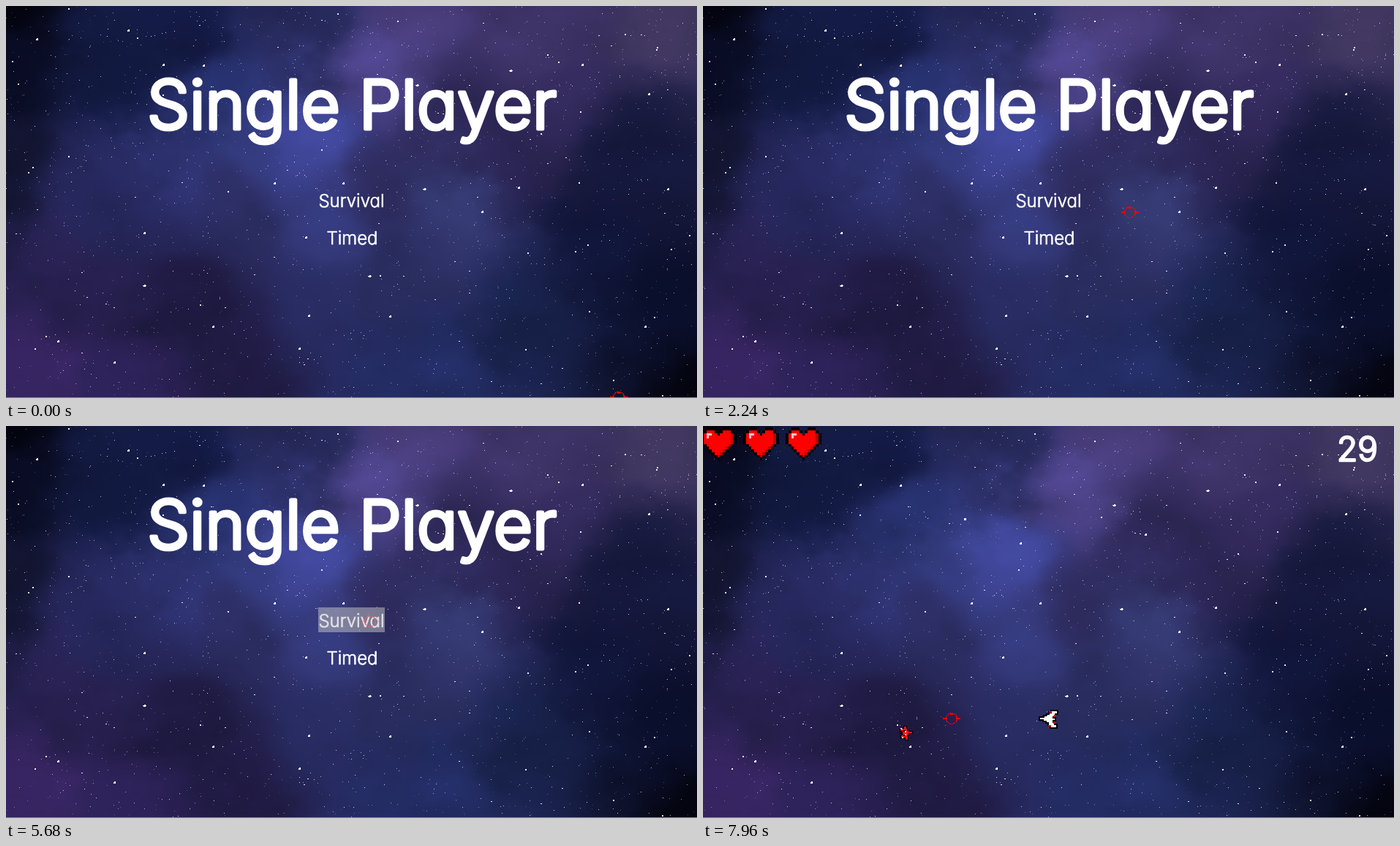
Animation, 945 px wide and 536 px high, one loop 8000 ms. Source, as an HTML page with a canvas:

```html
<!DOCTYPE html>
<html lang="en">
<head>
<meta charset="utf-8">
<title>Space shooter</title>
<style>
  html, body { margin: 0; width: 100%; height: 100%; overflow: hidden; background: #03040e; }
  canvas, svg { position: absolute; left: 0; top: 0; width: 945px; height: 536px; }
  text {
    font-family: Inter, "Open Sans", sans-serif; font-weight: 300;
    font-feature-settings: "cv11"; text-anchor: middle;
    fill: #fff; stroke: #fff; stroke-linejoin: round;
  }
  .title { font-size: 92px; stroke-width: 5px; }
  .item { font-size: 24px; stroke-width: .7px; }
  .timer { font-size: 46px; stroke-width: 2.4px; }
  .pixel { shape-rendering: crispEdges; }
</style>
</head>
<body>
<canvas id="sky" width="945" height="536"></canvas>
<svg viewBox="0 0 945 536">
  <defs>
    <g id="heart" class="pixel" transform="scale(3.77)">
      <path d="M2 0h3v1h1v1h1v-1h1v-1h3v1h1v1h1v4h-1v1h-1v1h-1v1h-1v1h-1v1h-1v1h-1v-1h-1v-1h-1v-1h-1v-1h-1v-1h-1v-1h-1v-4h1v-1h1z"/>
      <path fill="#f00" d="M2 1h3v1h1v1h1v-1h1v-1h3v1h1v4h-1v1h-1v1h-1v1h-1v1h-1v1h-1v-1h-1v-1h-1v-1h-1v-1h-1v-1h-1v-4h1z"/>
      <path fill="#b80000" d="M11 2h1v4h-1v1h-1v1h-1v1h-1v1h-1v1h-1v-1h1v-1h1v-1h1v-1h1v-1h1z"/>
      <path fill="#ffc4c4" d="M2 2h2v1h-1v1h-1z"/>
    </g>
  </defs>

  <g id="menu">
    <text class="title" x="473" y="167.5">Single Player</text>
    <text class="item" x="472.5" y="275">Survival</text>
    <text class="item" x="473.5" y="326">Timed</text>
  </g>

  <g id="game">
    <use href="#heart" x="-3" y="2"/>
    <use href="#heart" x="55" y="2"/>
    <use href="#heart" x="113" y="2"/>
    <text class="timer" id="timer" x="895" y="48"></text>
    <g id="ship" class="pixel">
      <path fill="#fff" stroke="#000" stroke-width="4" paint-order="stroke"
        d="M-1-11h2v5h2v4h2v3h3v3h3v7h-3v-3h-3v-2h-4v3h-2v-3h-4v2h-3v3h-3v-7h3v-3h3v-3h2v-4h2z"/>
      <path fill="#e00000" d="M-11 0h2v4h-2zM9 0h2v4h-2zM-6 7h3v3h-3zM3 7h3v3h-3z"/>
    </g>
    <g id="enemy" class="pixel">
      <path fill="#f01414" stroke="#000" stroke-width="2" paint-order="stroke"
        d="M-1-10h2v5h2v2h6v3h-3v6h-3v-3h-6v3h-3v-6h-3v-3h6v-2h2z"/>
      <path d="M-4-1h2v3h-2zM2-1h2v3h-2zM-1 3h2v4h-2z"/>
      <path fill="#fff" d="M-3-2h2v2h-2zM1-2h2v2h-2zM-7 3h2v2h-2zM5 3h2v2h-2z"/>
    </g>
  </g>

  <g id="cursor" class="pixel" fill="none" stroke="#f00">
    <circle r="7.5" stroke-dasharray="5 1"/>
    <path id="arms" stroke-width="2" d="M-12 0h6M6 0h6M-2-6h4"/>
  </g>
  <rect id="highlight" x="427" y="248" width="91" height="34" fill="#c8c8c8" opacity=".5"/>
  <rect y="535" width="945" height="1" fill="#88869a"/>
</svg>

<script>
const W = 945, H = 536, LOOP = 8000, GAME_START = 6840;
const el = id => document.getElementById(id);

let seed = 7;
function random() {
  seed = (Math.imul(seed, 1664525) + 1013904223) >>> 0;
  return seed / 4294967296;
}

const lattice = Float32Array.from({ length: 65536 }, random);
function noise(x, y) {
  const ix = Math.floor(x), iy = Math.floor(y);
  const smooth = v => v * v * (3 - 2 * v);
  const u = smooth(x - ix), v = smooth(y - iy);
  const at = (a, b) => lattice[(a & 255) + 256 * (b & 255)];
  const top = at(ix, iy) * (1 - u) + at(ix + 1, iy) * u;
  const low = at(ix, iy + 1) * (1 - u) + at(ix + 1, iy + 1) * u;
  return top * (1 - v) + low * v;
}
function clouds(x, y) {
  let sum = 0, amp = .5;
  for (let i = 0; i < 5; i++, amp /= 2, x = x * 2 + 17, y = y * 2 + 31) sum += amp * noise(x, y);
  return sum - .48;
}

// Main tones of the nebula: x, y, colour
const tones = [
  [0, 0, "03040e"], [150, 100, "121a42"], [300, 110, "252f6a"], [350, 180, "343c80"],
  [415, 190, "40479a"], [520, 90, "50468f"], [570, 25, "493d7b"], [720, 60, "3f3468"],
  [900, 20, "433963"], [760, 135, "32295a"], [630, 140, "2b2552"], [700, 215, "292350"],
  [870, 200, "14173a"], [900, 400, "0a0f2c"], [945, 536, "03040e"], [720, 430, "172149"],
  [600, 490, "222c62"], [520, 500, "242d66"], [610, 290, "33386f"], [440, 300, "363c80"],
  [310, 280, "2a2b5e"], [220, 235, "2f3474"], [145, 270, "25265a"], [230, 395, "1e1940"],
  [100, 375, "292152"], [50, 500, "34235d"], [330, 485, "211b45"], [430, 420, "272b60"],
  [0, 200, "131532"], [0, 90, "080b22"], [800, 310, "10153a"], [250, 25, "131a45"],
  [400, 25, "242756"], [520, 240, "2f2c60"], [530, 340, "2b2e62"], [180, 490, "2a2053"]
].map(([x, y, hex]) => [x, y, ...[0, 2, 4].map(i => parseInt(hex.slice(i, i + 2), 16))]);

const brightStars = [
  167, 33, 270, 81, 562, 108, 879, 120, 605, 148, 434, 160, 461, 242, 367, 242, 572, 250, 651, 281,
  905, 250, 401, 468, 410, 316, 189, 310, 189, 382, 414, 423, 148, 487, 71, 458, 874, 438, 788, 80,
  690, 88, 215, 80, 358, 127, 42, 45, 701, 248, 525, 424, 497, 369, 283, 438
];

function paintSky() {
  const ctx = el("sky").getContext("2d");
  const image = ctx.createImageData(W, H);
  for (let y = 0, p = 0; y < H; y++) {
    for (let x = 0; x < W; x++, p += 4) {
      const n = clouds(x / 110, y / 80), m = clouds(x / 75 + 90, y / 55 + 50);
      const wx = x + 110 * n, wy = y + 90 * m;
      let r = 0, g = 0, b = 0, total = 0;
      for (const tone of tones) {
        const dx = wx - tone[0], dy = wy - tone[1], d = dx * dx + dy * dy + 1200;
        const w = 1 / (d * d);
        r += w * tone[2]; g += w * tone[3]; b += w * tone[4]; total += w;
      }
      const shade = (1 + .3 * m) / total;
      image.data[p] = r * shade;
      image.data[p + 1] = g * shade;
      image.data[p + 2] = b * shade;
      image.data[p + 3] = 255;
    }
  }
  ctx.putImageData(image, 0, 0);

  for (let i = 0; i < 1900; i++) {
    const x = Math.floor(random() * W), y = Math.floor(random() * H), glow = random();
    ctx.fillStyle = `rgba(235,235,255,${.2 + .8 * glow ** 1.5})`;
    ctx.fillRect(x, y, glow > .96 ? 2 : 1, glow > .98 ? 2 : 1);
  }
  ctx.fillStyle = "#fff";
  for (let i = 0; i < brightStars.length; i += 2) {
    const x = brightStars[i], y = brightStars[i + 1];
    ctx.fillRect(x - 1, y, 3, 2);
    ctx.fillRect(x, y - 1, 2, 3);
    if (i % 12 === 4) ctx.fillRect(x - 2, y, 5, 1);
  }
}

// Pointer route: time, x, y
const route = [
  [0, 838, 535], [520, 838, 535], [640, 866, 510], [860, 800, 455], [1160, 677, 438],
  [1310, 709, 454], [1330, 714, 453], [1470, 714, 453], [1510, 729, 454], [1540, 726, 448],
  [1800, 695, 400], [2270, 577, 274], [2420, 550, 268], [2710, 507, 262], [2900, 497, 264],
  [4050, 497, 264], [4100, 497, 265], [5670, 497, 265], [5680, 498, 267], [5880, 489, 277],
  [6330, 489, 277], [6360, 483, 275], [6840, 483, 275], [7100, 476, 278], [7360, 454, 290],
  [7620, 415, 371], [7960, 340, 400], [8000, 340, 400]
];
function pointerAt(t) {
  const i = route.findIndex(stop => stop[0] > t);
  const [t0, x0, y0] = route[i - 1], [t1, x1, y1] = route[i];
  const k = (t - t0) / (t1 - t0);
  return [Math.round(x0 + (x1 - x0) * k), Math.round(y0 + (y1 - y0) * k)];
}

const SHIP = [472.5, 400.5];
const show = (id, on) => el(id).setAttribute("visibility", on ? "visible" : "hidden");
function place(id, [x, y], target) {
  const angle = target ? Math.atan2(target[0] - x, y - target[1]) * 180 / Math.PI : 0;
  el(id).setAttribute("transform", `translate(${x} ${y}) rotate(${angle})`);
}

function draw() {
  const t = performance.now() % LOOP;
  const pointer = pointerAt(t), playing = t >= GAME_START, age = t - GAME_START;
  show("menu", !playing);
  show("game", playing);
  show("highlight", !playing && t > 2000 && pointer[0] < 518);
  place("cursor", pointer);
  el("arms").setAttribute("opacity", t > 2900 && t < 7000 ? .3 : 1);
  if (playing) {
    el("timer").textContent = age < 260 ? 30 : 29;
    place("ship", SHIP, pointer);
    place("enemy", [2 + .2445 * age, 489 - .0616 * age], SHIP);
  }
  requestAnimationFrame(draw);
}

paintSky();
draw();
</script>
</body>
</html>
```
